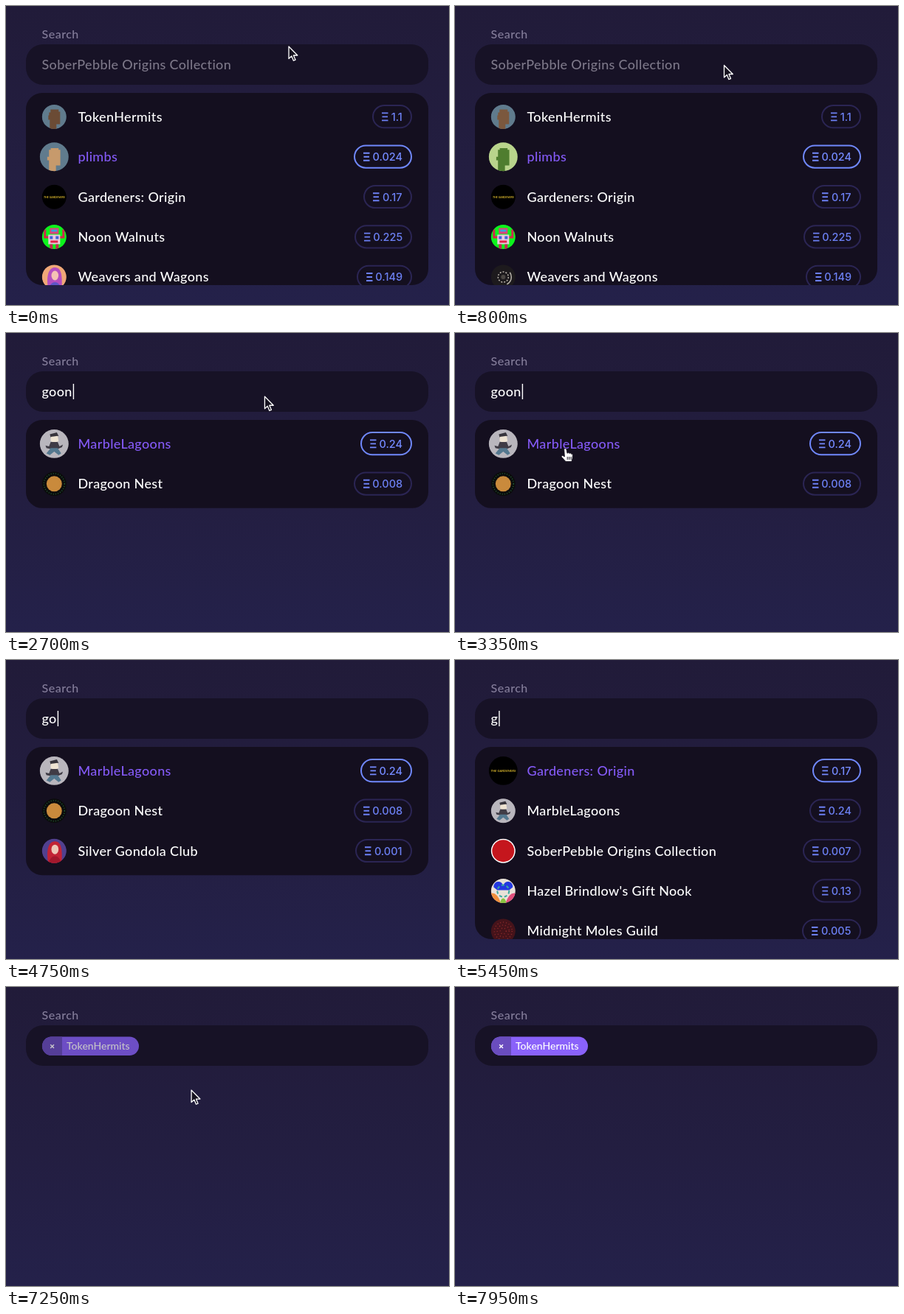
These frames come from a looping animation (600x406 px, 8 s). An HTML page:

```html
<!DOCTYPE html>
<html lang="en">
<head>
<meta charset="utf-8">
<title>Collection search</title>
<style>
html, body { margin: 0; width: 100%; height: 100%; overflow: hidden; background: #211c3c; }
svg { display: block; width: 100vw; height: 100vh; }
text { font-family: Lato, "Open Sans", sans-serif; font-weight: 500; font-size: 18px; letter-spacing: .35px; white-space: pre; }
.label { font-size: 16px; letter-spacing: .5px; fill: #857e9b; }
.price { font: 500 14.5px Inter, Roboto, sans-serif; letter-spacing: 0; text-anchor: middle; }
.tag { font-size: 14px; letter-spacing: 0; fill: #fff; }
.mini { font: italic 700 3.8px Lato, sans-serif; letter-spacing: 0; text-anchor: middle; fill: #d9b62c; }
</style>
</head>
<body>
<svg viewBox="0 0 600 406">
  <defs>
    <linearGradient id="bg" x2="0" y2="1">
      <stop stop-color="#211b39"/><stop offset=".55" stop-color="#231e41"/><stop offset="1" stop-color="#24214a"/>
    </linearGradient>
    <clipPath id="disc"><circle r="16.5"/></clipPath>
    <clipPath id="clip"><rect id="clipBox" x="27" y="118" width="545" rx="22"/></clipPath>
  </defs>
  <rect width="600" height="406" fill="url(#bg)"/>
  <text class="label" x="48.5" y="43.5">Search</text>
  <rect x="27" y="52" width="545" height="55" rx="23" fill="#171226"/>
  <text id="input" x="48.5" y="86"></text>
  <rect id="caret" y="69" width="1.4" height="21" fill="#fff"/>
  <g id="panel">
    <rect id="box" x="27" y="118" width="545" rx="22" fill="#140f1f"/>
    <g id="rows" clip-path="url(#clip)"></g>
  </g>
  <g id="tag">
    <rect x="49" y="67.5" width="131" height="25.5" rx="12.7" fill="#8a62fa"/>
    <path d="M76 67.5H61.7a12.7 12.7 0 0 0 0 25.5H76z" fill="#6a4dbe"/>
    <path d="M60.2 78.2l4.8 4.8m0-4.8l-4.8 4.8" stroke="#fff" stroke-width="1.5"/>
    <text class="tag" x="82" y="85.2">TokenHermits</text>
  </g>
  <path id="arrow" d="M0 0V16.5L3.8 13 6.4 19.2 9 18.1 6.4 12H11.8Z" fill="#16121f" stroke="#fff" stroke-width="1.3" stroke-linejoin="round"/>
  <g id="hand" stroke-linejoin="round">
    <path d="M-1.3.6C0-.8 1.6 0 2 1.4L3 6.4C4 5 5.6 5.4 5.9 6.6 7 5.6 8.3 6.2 8.5 7.4 9.6 6.8 10.4 7.6 10.4 8.8L10 13.5 8.8 17.5H1L-4.6 11.4C-5.2 9.8-3.8 9-2.6 9.8L-.6 11Z" fill="#fff" stroke="#16121f" stroke-width=".8"/>
    <path d="M3.2 11v4M5.6 11v4M8 11v4" stroke="#16121f"/>
  </g>
</svg>
<script>
const $ = id => document.getElementById(id);
const LOOP = 8000, ROW = 54.4, FADE = 250;

const clamp = v => Math.max(0, Math.min(1, v));
const smooth = v => (v = clamp(v)) * v * (3 - 2 * v);
const mix = (a, b, k) => 'rgb(' + a.map((v, i) => Math.round(v + (b[i] - v) * k)) + ')';

// Avatar pieces, drawn around 0,0 inside a disc of radius 16.5
const disc = (fill, r = 17) => `<circle r="${r}" fill="${fill}"/>`;
const shape = (d, fill) => `<path d="${d}" fill="${fill}"/>`;
const head = (bg, fill, d) => disc(bg) + shape(d, fill);
const bust = 'M-6-8H-4V-10H5V-8H7V10H2V17H-6V4H-8V0H-6Z';
const capped = 'M-7-6H-5V-10H6V-7H8V10H3V17H-6V4H-8V-2H-7Z';
const lady = (bg, hair, skin, dress) => disc(bg)
  + shape('M-8 17C-11 2-9-13 1-13S11 2 10 17Z', hair)
  + `<ellipse cx="1" cy="-2" rx="4.8" ry="6.5" fill="${skin}"/>`
  + shape('M-8 17Q-5 7 1 7T10 17Z', dress);
const ring = (r, color, dash, w = 1.5) =>
  `<circle r="${r}" fill="none" stroke="${color}" stroke-width="${w}" stroke-dasharray="${dash}"/>`;

const robot = disc('#0cf41c')
  + shape('M-14-10H-11V-1H-7V2H-14ZM14-10H11V-1H7V2H14Z', '#d3264e')
  + shape('M-6-12H6V-4H-6Z', '#e0407a') + shape('M-4-10H4V-7H-4Z', '#3f9fd8')
  + shape('M-8-3H8V10H-8Z', '#e9c9dc') + shape('M-6-1H-2V3H-6ZM2-1H6V3H2Z', '#3f62d8')
  + shape('M-5 5H5V8H-5Z', '#e3224a') + shape('M-6 10H-2V17H-6ZM2 10H6V17H2Z', '#c22c52');
const walker = disc('#b9b6bd')
  + shape('M-5-11L3-13 5-9-4-7Z', '#37343c') + shape('M-4-8L4-9 5-3 0-1-4-3Z', '#eee3d2')
  + shape('M-4-2L4-2 6 3 10 1 9 4 4 6H-4L-9 5-10 2-6 3Z', '#403c46')
  + shape('M-4 5H4L8 11 5 13 0 9-5 13-9 11Z', '#54788f');
const shop = disc('#e9e2d8')
  + shape('M-13-5A6 6 0 0 1 0-7 6 6 0 0 1 13-5L8-1H-8Z', '#2439e0')
  + shape('M-17 17V3Q-8 1-3 17Z', '#ef8f3c') + shape('M17 17V3Q8 1 3 17Z', '#e14e7c')
  + ring(8, '#38a9a0', '4 3', 2) + shape('M-4 17A4 7 0 0 1 4 17Z', '#8ac441');

const item = (name, price, left, ...pics) => ({ name, price, left, pics });
const hermits = item('TokenHermits', '1.1', 496, head('#607b8d', '#6b4b35', capped),
  head('#607b8d', '#7b583e', capped), head('#607b8d', '#5b3f2b', capped));
const plimbs = item('plimbs', '0.024', 471, head('#607b8d', '#c79a6c', bust), head('#b9d48c', '#4f7d2f', bust));
const gardeners = item('Gardeners: Origin', '0.17', 484,
  disc('#000') + '<text class="mini" y="1.4">THE GARDENERS</text>');
const walnuts = item('Noon Walnuts', '0.225', 472, robot);
const weavers = item('Weavers and Wagons', '0.149', 475,
  lady('#f0a878', '#b54fc0', '#f5c3b4', '#5f55c8'),
  disc('#1d1a1d') + ring(11, '#b9b3ab', '12 50') + ring(7, '#b9b3ab', '2 2') + disc('#4b4744', 3),
  lady('#eee2d0', '#2b171c', '#a86a50', '#c93a4c'));
const lagoons = item('MarbleLagoons', '0.24', 480, walker);
const dragoon = item('Dragoon Nest', '0.008', 471, disc('#0b0c0c') + ring(14, '#1f5a35', '1 2.2') + disc('#c98a3c', 10.5));
const gondola = item('Silver Gondola Club', '0.001', 473, lady('#51408f', '#c22335', '#edc8b8', '#a3182c'));
const pebble = item('SoberPebble Origins Collection', '0.007', 471, disc('#fff') + disc('#c5161d', 15));
const nook = item("Hazel Brindlow's Gift Nook", '0.13', 484, shop);
const moles = item('Midnight Moles Guild', '0.005', 470,
  disc('#45131a') + ring(12, '#8f2a2c', '1 3') + ring(8, '#8f2a2c', '1 3') + ring(4, '#8f2a2c', '1 3'));

const all = [hermits, plimbs, gardeners, walnuts, weavers];
const withG = [gardeners, lagoons, pebble, nook, moles];
const withGo = [lagoons, dragoon, gondola];
const withGoo = [lagoons, dragoon];

// Each step: start time, query, results, active row, time the active row began to light up
const steps = [
  [0, '', all, 1, -FADE], [1650, 'g', withG, 0, 1650], [1850, 'go', withGo, 0, 1850],
  [2100, 'goo', withGoo, 0, 1850], [2250, 'goon', withGoo, 0, 1850],
  [4400, 'goo', withGoo, 0, 1850], [4600, 'go', withGo, 0, 1850],
  [5180, 'g', withG, 0, 5180], [5530, '', all, 0, 5530]
];
const FOCUS = 1200, PICK = 7150;

// Pointer spans: lists of [time, x, y]; hidden while typing
const spans = [
  [[0, 383, 55], [800, 364.5, 80.5], [1200, 354, 85], [1650, 354, 85]],
  [[2650, 354, 85], [3300, 149, 157], [4400, 152, 158]],
  [[6050, 152, 158], [6500, 259, 139], [7200, 252, 140], [7650, 226, 142], [7940, 206, -22], [8000, 206, -22]]
];

function pointerAt(t) {
  const span = spans.find(s => t >= s[0][0] && t < s[s.length - 1][0]);
  if (!span) return null;
  const i = span.findIndex(p => p[0] > t);
  const [a, b] = [span[i - 1], span[i]];
  const k = smooth((t - a[0]) / (b[0] - a[0]));
  return [a[1] + (b[1] - a[1]) * k, a[2] + (b[2] - a[2]) * k];
}

function row(entry, i, k, t) {
  const y = 150.4 + i * ROW, { name, price, left, pics } = entry;
  const blue = mix([108, 128, 244], [116, 138, 255], k);
  return `<g transform="translate(65.3 ${y}) scale(${1 + .18 * k})"><g clip-path="url(#disc)">${pics[Math.floor(t / 750) % pics.length]}</g></g>
    <text x="97.5" y="${y + 6.3}" fill="${mix([255, 255, 255], [132, 90, 246], k)}">${name}</text>
    <rect x="${left + 1}" y="${y - 15.3}" width="${548 - left}" height="30.2" rx="15.1" fill="none" stroke="${mix([43, 37, 84], [112, 136, 252], k)}" stroke-width="2"/>
    <path d="M${left + 13} ${y - 5}h8.5m-8 5h7.5m-8 5h8.5" stroke="${blue}" stroke-width="1.9"/>
    <text class="price" x="${(left + 562.5) / 2}" y="${y + 5.4}" fill="${blue}">${price}</text>`;
}

let shown = '';
function draw(t) {
  const [since, query, list, active, lit] = steps.filter(s => s[0] <= t).pop();
  const open = t < PICK;

  const hint = t < 1650 ? pebble.name : 'TileOrchid';
  $('input').textContent = open ? query || hint : '';
  $('input').setAttribute('fill', query ? '#fff' : '#7c7788');
  const caretX = query ? 49.5 + $('input').getComputedTextLength() : 49;
  $('caret').setAttribute('x', caretX);
  const blinkFrom = Math.max(since, FOCUS);
  $('caret').style.display = open && t >= FOCUS && (t - blinkFrom) % 1000 < 500 ? '' : 'none';

  $('panel').style.display = open ? '' : 'none';
  const height = Math.min(261, list.length * ROW + 11);
  $('box').setAttribute('height', height);
  $('clipBox').setAttribute('height', height);
  const glow = smooth((t - lit) / FADE);
  const html = list.map((e, i) => row(e, i, i === active ? glow : 0, t)).join('');
  if (html !== shown) $('rows').innerHTML = shown = html;

  $('tag').setAttribute('opacity', smooth((t - PICK) / 150));

  const at = pointerAt(t), over = open && at && at[1] > 118;
  $('arrow').style.display = at && !over ? '' : 'none';
  $('hand').style.display = over ? '' : 'none';
  if (at) $(over ? 'hand' : 'arrow').setAttribute('transform', `translate(${at})`);
}

const start = performance.now();
function tick() {
  draw((performance.now() - start) % LOOP);
  requestAnimationFrame(tick);
}
tick();
</script>
</body>
</html>
```
